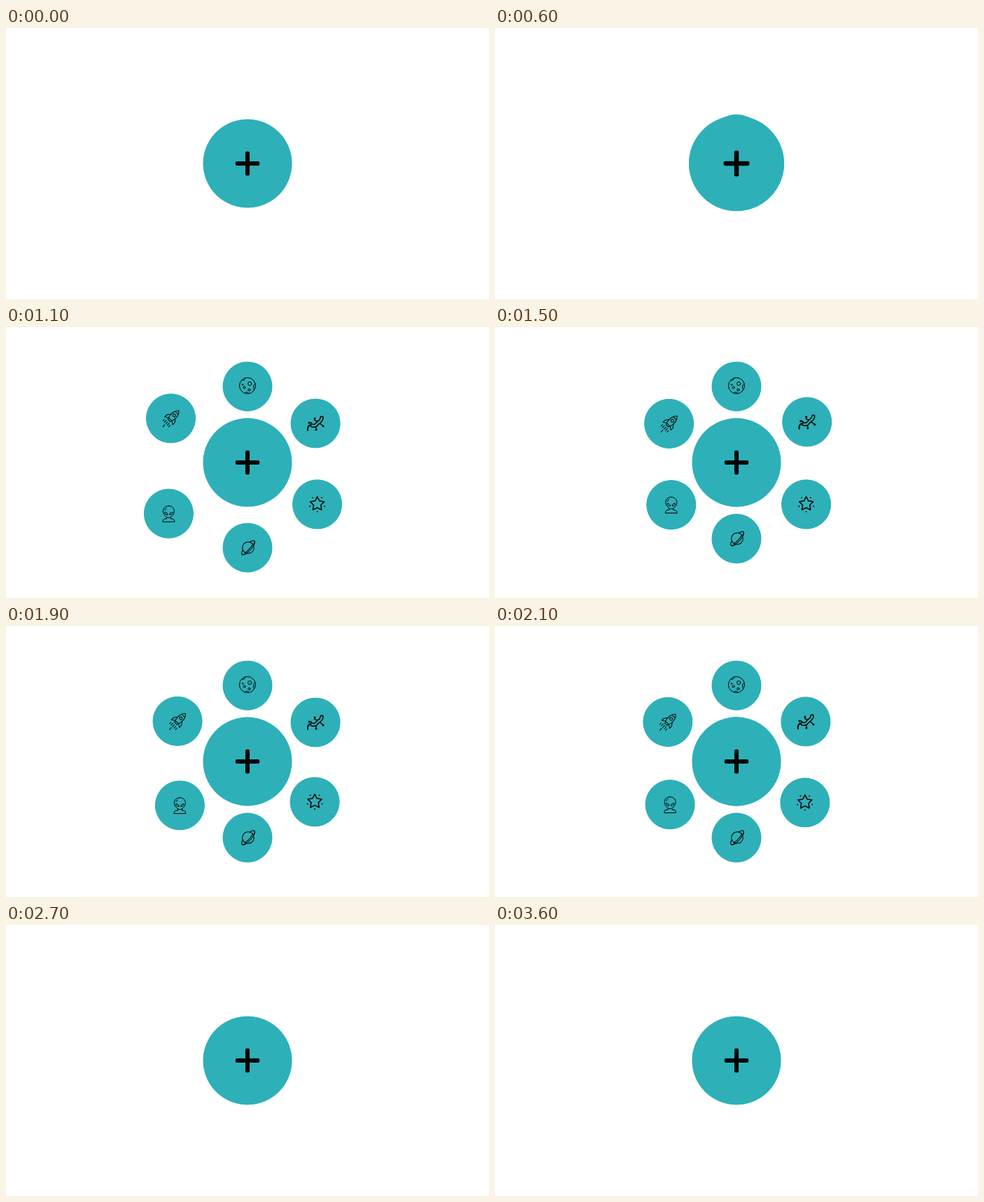
An HTML page for the animation above (3700 ms loop, 690 px wide and 388 px high).

```html
<!DOCTYPE html>
<html lang="en">
<head>
<meta charset="utf-8">
<title>Gooey menu</title>
<style>
  html, body { margin: 0; width: 100%; height: 100%; overflow: hidden; background: #fff; }
  svg { display: block; width: 690px; height: 388px; }
  .teal { fill: #2eb0b8; }
  .dark { fill: #000; stroke: none; }
  .icon { fill: none; stroke: #000; stroke-width: 1; stroke-linecap: round; stroke-linejoin: round; }
</style>
</head>
<body>
<svg viewBox="0 0 690 388">
  <defs>
    <filter id="goo" filterUnits="userSpaceOnUse" x="0" y="0" width="690" height="388" color-interpolation-filters="sRGB">
      <feGaussianBlur stdDeviation="5.5"/>
      <feColorMatrix values="1 0 0 0 0  0 1 0 0 0  0 0 1 0 0  0 0 0 18 -7"/>
    </filter>

    <g id="moon" transform="translate(0 -1)">
      <circle r="11.5"/>
      <circle cx="3.2" cy="-2.8" r="2.6"/>
      <circle cx="-4.5" cy="2.6" r="1.6"/>
      <circle cx="2.4" cy="6" r="1.6"/>
      <circle cx="-7" cy="-1.5" r=".8"/>
      <path d="M-8-8Q-4-6-3.5-11M11-3Q6.500 0 9.500 6M-4 10.500Q-1 7.500 2 11"/>
    </g>

    <g id="gecko">
      <path stroke-width="2" d="M-11 10C-12 4-8 1-4 3"/>
      <path stroke-width="1.4" d="M3-3L-1-4V-7M6 0L9 2L11 4M-2 4L1 6V9M-5 2L-6-1L-9-1"/>
      <path stroke-width="5.4" d="M9-8C9-3 4-2 2 1S-2 4-5 3"/>
      <path stroke="#2eb0b8" stroke-width="2.4" d="M9-8C9-3 4-2 2 1S-2 4-5 3"/>
      <g class="dark">
        <circle cx="-1" cy="-7" r="1.5"/><circle cx="11" cy="4" r="1.5"/>
        <circle cx="1" cy="9" r="1.5"/><circle cx="-9" cy="-1" r="1.5"/>
      </g>
    </g>

    <g id="star" transform="translate(0 -.5)">
      <path id="starOutline" stroke-width="1.5"/>
      <g id="starDots" class="dark"></g>
    </g>

    <g id="planet" transform="translate(1 0) rotate(-48)">
      <ellipse rx="13" ry="4.500"/>
      <circle class="teal" r="8.300"/>
      <path d="M-13 0A13 4.500 0 0 0 13 0M-9 1A10 2.500 0 0 0 9 1"/>
    </g>

    <g id="alien" transform="translate(0 .5)">
      <path d="M0-11.5C5-11.5 8-8 8-4C8 1 3 5.500 0 5.500S-8 1-8-4C-8-8-5-11.500 0-11.500Z"/>
      <path d="M-1.500 1C-5 1.500-6-1-5.500-2.500C-3-2.500-1-1-1.500 1ZM1.500 1C5 1.500 6-1 5.500-2.500C3-2.500 1-1 1.500 1Z"/>
      <path d="M-3-8.500Q-5-7.500-5.500-5.500M-3 5V7H-6Q-8.500 8-8.500 11.300H8.500Q8.500 8 6 7H3V5"/>
    </g>

    <g id="rocket" transform="translate(.5 0) rotate(45)">
      <path d="M0-15.500C4-12 5.500-6 3.500 2H-3.500C-5.500-6-4-12 0-15.500ZM-3.200-11H3.200M-2.500 2V4.500H2.500V2"/>
      <circle cy="-6" r="2"/>
      <path d="M-4.500-4L-8 1V5L-3.500 2M4.500-4L8 1V5L3.500 2"/>
      <path stroke-dasharray="4 2.200" d="M-3 7V13M0 7V17M3 7V13M-6 8V11M6 8V11"/>
    </g>
  </defs>

  <g id="blobs" class="teal" filter="url(#goo)"></g>
  <g id="icons"></g>
  <g id="hub">
    <circle class="teal" r="62.6"/>
    <rect x="-17.2" y="-3" width="34.4" height="6" rx="2"/>
    <rect x="-3" y="-17.2" width="6" height="34.4" rx="2"/>
  </g>
</svg>
<script>
  const LOOP = 3700, STEP = 100, CX = 345, CY = 194;
  const OPEN = 570, CLOSE = 2128, STAGGER = 72, DURATION = 450;
  const $ = id => document.getElementById(id);

  function add(parent, tag, attrs) {
    const node = document.createElementNS('http://www.w3.org/2000/svg', tag);
    for (const key in attrs) node.setAttribute(key, attrs[key]);
    return parent.appendChild(node);
  }

  const polar = (angle, r) => {
    const a = angle * Math.PI / 180;
    return [r * Math.cos(a), r * Math.sin(a)];
  };
  const clamp = p => Math.min(1, Math.max(0, p));

  // Five points with a small dot in each notch
  const corners = Array.from({ length: 10 }, (_, i) => polar(i * 36 - 90, i % 2 ? 5.4 : 10.5));
  $('starOutline').setAttribute('d', 'M' + corners.map(p => p.map(v => v.toFixed(2))).join('L') + 'Z');
  for (let i = 0; i < 5; i++) {
    const [cx, cy] = polar(i * 72 - 54, 11);
    add($('starDots'), 'circle', { cx, cy, r: 0.9 });
  }

  // Rises past 1, then settles back
  function backOut(time) {
    const u = clamp(time / DURATION) - 1, s = 2.3;
    return 1 + (s + 1) * u ** 3 + s * u ** 2;
  }

  // One swell and return of the hub
  const press = time => Math.sin(Math.PI * clamp(time / 600)) ** 2;

  // The side items rest a little farther out and sway left and right
  function distance(t, i, angle) {
    const [side] = polar(angle, 1);
    const sway = side * (0.5 + 2.4 * Math.cos(2 * Math.PI * (t - 1500) / 800));
    const amount = backOut(t - OPEN - i * STAGGER) - backOut(t - CLOSE - i * STAGGER);
    return amount * (109 + 5.5 * Math.abs(side) + sway);
  }

  const items = Object.entries({ moon: -90, gecko: -30, star: 31, planet: 90, alien: 147, rocket: 210 })
    .map(([icon, angle]) => ({
      angle,
      parts: [
        add($('blobs'), 'circle', { r: 34.8 }),
        add($('icons'), 'use', { href: '#' + icon, class: 'icon' })
      ]
    }));
  const hubParts = [add($('blobs'), 'circle', { r: 62.6 }), $('hub')];

  const place = (nodes, x, y, scale = 1) => nodes.forEach(node =>
    node.setAttribute('transform', `translate(${x} ${y}) scale(${scale})`));

  function draw(now) {
    const t = Math.floor(now % LOOP / STEP) * STEP;
    items.forEach(({ angle, parts }, i) => {
      const [x, y] = polar(angle, distance(t, i, angle));
      place(parts, CX + x, CY + y);
    });
    place(hubParts, CX, CY, 1 + 0.075 * (press(t - 320) + press(t - 2080)));
  }

  const start = performance.now();
  function tick() {
    draw(performance.now() - start);
    requestAnimationFrame(tick);
  }
  tick();
</script>
</body>
</html>
```
